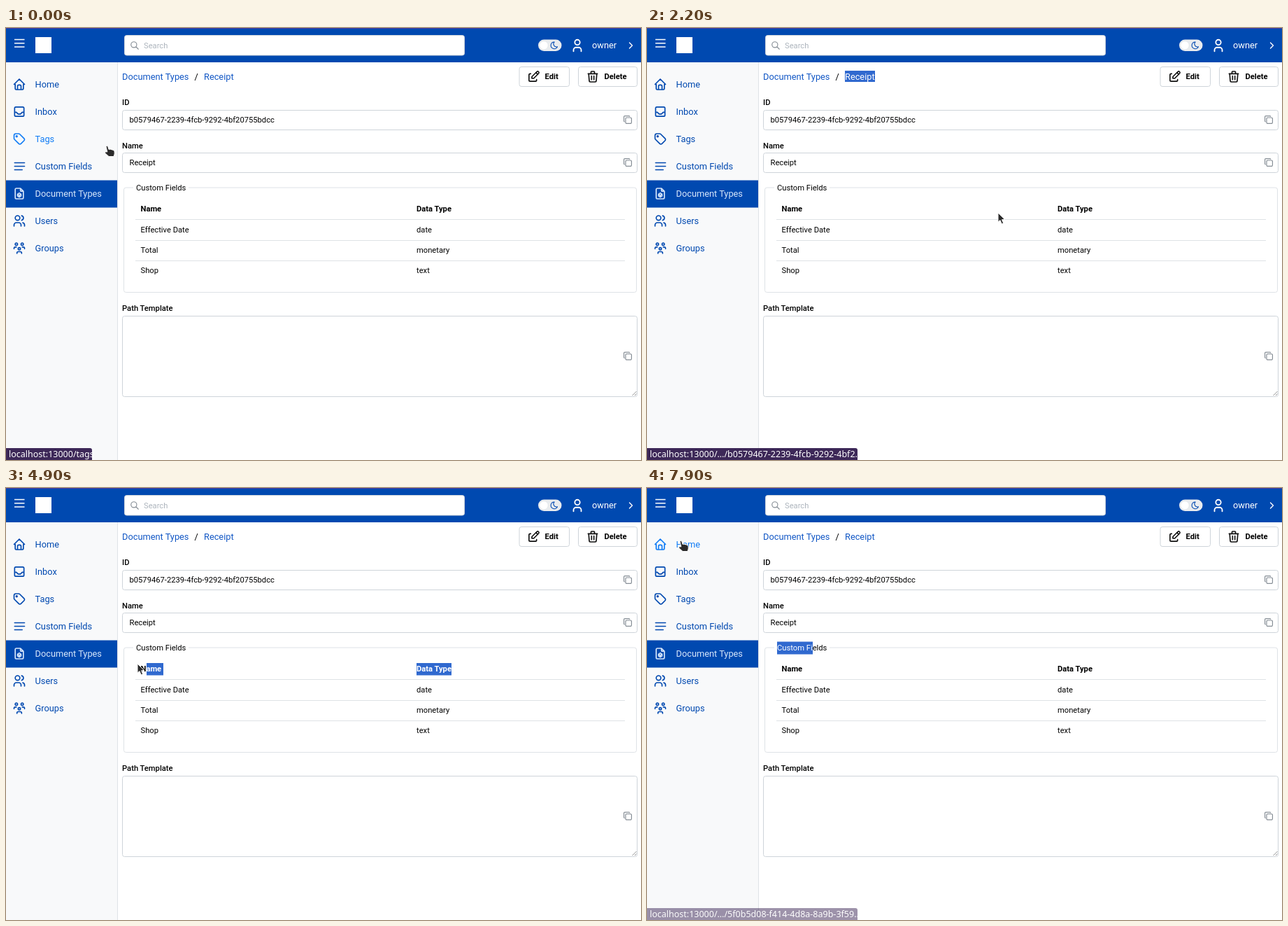
Animation, 908 px wide and 617 px high, one loop 8 s. Source, as an HTML page:

```html
<!DOCTYPE html>
<html lang="en">
<head>
<meta charset="utf-8">
<title>Document type details</title>
<style>
  html, body { margin: 0; width: 100%; height: 100%; overflow: hidden; background: #fff; }
  svg { display: block; width: 908px; height: 617px; font-family: Roboto, sans-serif; }
  text { white-space: pre; }
</style>
</head>
<body>
<svg id="stage" viewBox="0 0 908 617"></svg>
<script>
const LOOP = 8000, STEP = 100;
const BLUE = '#0049b0', LINK = '#1257c5', HOVER = '#117cf5', BORDER = '#ced4da', SELECT = '#3069cf';
const stage = document.getElementById('stage');

function add(tag, attrs, parent = stage) {
  const node = document.createElementNS('http://www.w3.org/2000/svg', tag);
  for (const key in attrs) node.setAttribute(key, attrs[key]);
  parent.append(node);
  return node;
}
const rect = (x, y, width, height, fill, more = {}, parent) =>
  add('rect', { x, y, width, height, fill, ...more }, parent);
const box = (x, y, w, h, stroke = BORDER, rx = 3) => rect(x, y, w, h, '#fff', { stroke, rx });
const line = (d, stroke, width = 1) => add('path', { d, stroke, 'stroke-width': width, fill: 'none' });
function label(content, x, y, { size = 11.2, weight = 400, fill = '#000', ...more } = {}, parent) {
  const node = add('text', { x, y, fill, 'font-size': size, 'font-weight': weight, ...more }, parent);
  node.textContent = content;
  return node;
}

const ICONS = {
  home: 'M5 12H3l9-9 9 9h-2M5 12v7a2 2 0 0 0 2 2h10a2 2 0 0 0 2-2v-7M9 21v-6a2 2 0 0 1 2-2h2a2 2 0 0 1 2 2v6',
  inbox: 'M4 6a2 2 0 0 1 2-2h12a2 2 0 0 1 2 2v12a2 2 0 0 1-2 2H6a2 2 0 0 1-2-2zM4 13h3l3 3h4l3-3h3',
  tag: 'M6.5 7.5a1 1 0 1 0 2 0a1 1 0 1 0-2 0M3 6v5.2a2 2 0 0 0 .6 1.4l7.7 7.7a2.4 2.4 0 0 0 3.4 0l5.6-5.6a2.4 2.4 0 0 0 0-3.4l-7.7-7.7A2 2 0 0 0 11.2 3H6a3 3 0 0 0-3 3z',
  lines: 'M4 6h17M4 12h17M4 18h13',
  file: 'M14 3v4a1 1 0 0 0 1 1h4M17 21H7a2 2 0 0 1-2-2V5a2 2 0 0 1 2-2h7l5 5v11a2 2 0 0 1-2 2zM9 13v3l3 2 3-2v-3l-3-2zM9 13l3 2 3-2M12 15v3',
  users: 'M5 7a4 4 0 1 0 8 0a4 4 0 1 0-8 0M3 21v-2a4 4 0 0 1 4-4h4a4 4 0 0 1 4 4v2M16 3.1a4 4 0 0 1 0 7.8M21 21v-2a4 4 0 0 0-3-3.8',
  group: 'M10 13a2 2 0 1 0 4 0a2 2 0 0 0-4 0M8 21v-1a2 2 0 0 1 2-2h4a2 2 0 0 1 2 2v1M15 5a2 2 0 1 0 4 0a2 2 0 0 0-4 0M17 10h2a2 2 0 0 1 2 2v1M5 5a2 2 0 1 0 4 0a2 2 0 0 0-4 0M3 13v-1a2 2 0 0 1 2-2h2',
  user: 'M8 7a4 4 0 1 0 8 0a4 4 0 0 0-8 0M6 21v-2a4 4 0 0 1 4-4h4a4 4 0 0 1 4 4v2',
  chevron: 'M9 6l6 6-6 6',
  edit: 'M7 7H6a2 2 0 0 0-2 2v9a2 2 0 0 0 2 2h9a2 2 0 0 0 2-2v-1M20.4 6.6a2.1 2.1 0 0 0-3-3L9 12v3h3zM16 5l3 3',
  trash: 'M4 7h16M10 11v6M14 11v6M5 7l1 12a2 2 0 0 0 2 2h8a2 2 0 0 0 2-2l1-12M9 7V4a1 1 0 0 1 1-1h4a1 1 0 0 1 1 1v3',
  copy: 'M7 9.7A2.7 2.7 0 0 1 9.7 7h8.6A2.7 2.7 0 0 1 21 9.7v8.6A2.7 2.7 0 0 1 18.3 21H9.7A2.7 2.7 0 0 1 7 18.3zM4 16.7A2 2 0 0 1 3 15V5c0-1.1.9-2 2-2h10c.8 0 1.2.4 1.5 1',
  search: 'M3 10a7 7 0 1 0 14 0a7 7 0 1 0-14 0M21 21l-6-6',
  moon: 'M12 3h.4a7.5 7.5 0 0 0 7.9 12.4A9 9 0 1 1 12 3z'
};
const icon = (name, cx, cy, size, stroke, parent) => add('path', {
  d: ICONS[name], stroke, fill: 'none', 'stroke-width': 2, 'stroke-linecap': 'round', 'stroke-linejoin': 'round',
  transform: `translate(${cx - size / 2} ${cy - size / 2}) scale(${size / 24})`
}, parent);

// Text whose selected span is shown white on blue.
let clipCount = 0;
function selectable(content, x, y, top, height, style) {
  const id = 'selection' + clipCount++;
  label(content, x, y, style);
  const mark = rect(0, top, 0, height, SELECT);
  const clip = rect(0, top, 0, height, '#000', {}, add('clipPath', { id }));
  label(content, x, y, { ...style, fill: '#fff', 'clip-path': `url(#${id})` });
  return (from, to) => {
    for (const node of [mark, clip]) {
      node.setAttribute('x', from);
      node.setAttribute('width', Math.max(0, to - from));
    }
  };
}

// Header
rect(0, 0, 908, 49, BLUE);
rect(0, 0, 908, 1, '#4b3a9c');
line('M12 16.5h14.5M12 21.7h14.5M12 26.9h14.5', '#fff', 1.5);
rect(42, 13, 23, 23, '#fff');
box(169.5, 10.5, 486, 28.5);
icon('search', 184, 25, 14, '#868e96');
label('Search', 197, 29, { fill: '#adb5bd' });
rect(761, 16.5, 33.5, 16.5, '#e9ecef', { rx: 8.2 });
add('circle', { cx: 769, cy: 24.8, r: 6.2, fill: '#fff', stroke: '#dee2e6', 'stroke-width': .7 });
icon('moon', 784, 24.8, 13, BLUE);
icon('user', 817, 25, 22, '#fff');
label('owner', 838, 29, { size: 12.8, fill: '#fff' });
icon('chevron', 893.5, 25, 16, '#fff');

// Sidebar
rect(0, 49, 159, 568, '#f8f9fa');
rect(159, 49, 1, 568, '#dee2e6');
rect(0, 217.5, 159, 39, BLUE);
const ACTIVE = 4;
const navItems = [
  ['Home', 'home'], ['Inbox', 'inbox'], ['Tags', 'tag'], ['Custom Fields', 'lines'],
  ['Document Types', 'file'], ['Users', 'users'], ['Groups', 'group']
].map(([name, glyph], i) => {
  const item = add('g', {}), y = 80.5 + 39 * i;
  icon(glyph, 19, y, 20, 'currentColor', item);
  label(name, 41.5, y + 4.4, { size: 12.8, fill: 'currentColor' }, item);
  return item;
});

// Breadcrumbs and buttons
label('Document Types', 166, 73.6, { size: 12.8, fill: LINK });
label('/', 269.5, 73.6, { size: 12.8 });
const selectReceipt = selectable('Receipt', 283, 73.6, 61, 16, { size: 12.8, fill: LINK });
const button = (name, glyph, x, width, textX) => {
  box(x, 55.5, width, 28);
  icon(glyph, x + 20.5, 69.5, 20, '#111');
  label(name, textX, 73.4, { weight: 600 });
};
button('Edit', 'edit', 734, 71.5, 770.5);
button('Delete', 'trash', 818.5, 84, 855.5);

// Form
const field = (name, value, labelY, top, height) => {
  label(name, 166, labelY, { weight: 500 });
  box(166.5, top, 736, height);
  label(value, 176.5, top + 17.8);
  icon('copy', 889, top + height / 2 - .5, 14.5, '#868e96');
};
field('ID', 'b0579467-2239-4fcb-9292-4bf20755bdcc', 110, 117.5, 28);
field('Name', 'Receipt', 172, 178.5, 28);
box(168.5, 228, 733, 149.5, '#dee2e6');
rect(182, 226, 79, 4, '#fff');
const selectLegend = selectable('Custom Fields', 186, 232, 219.5, 18);
const selectName = selectable('Name', 192.5, 262, 250, 17.5, { weight: 700 });
const selectType = selectable('Data Type', 587, 262, 250, 17.5, { weight: 700 });
line('M185 273.5h700M185 303.5h700M185 332.5h700', '#dee2e6');
[['Effective Date', 'date'], ['Total', 'monetary'], ['Shop', 'text']].forEach(([name, type], i) => {
  label(name, 192.5, 291.7 + 29.2 * i);
  label(type, 587, 291.7 + 29.2 * i);
});
field('Path Template', '', 404, 411.5, 115);
line('M895.5 525l6-6M899 525l2.5-2.5', '#777', .8);

// Link preview in the corner
const status = add('g', {});
const statusBox = add('path', { fill: '#3d2858' }, status);
const statusText = label('', 4, 613, { size: 12.5, fill: '#fff', 'font-family': 'Noto Sans, sans-serif' }, status);

// Mouse pointer, tip at the origin
const pointer = add('g', { stroke: '#fff', 'stroke-width': 1, 'stroke-linejoin': 'round', fill: '#2b2b2b' });
const arrow = add('path', { d: 'M0 0V13.2L3 10.6 5.2 15.8 7.7 14.7 5.5 9.8 9.7 9.5Z' }, pointer);
const hand = add('path', {
  d: 'M-1 1.2Q0-.6 1.6.8L3 5.4 5 5 7 5.7 9 6.2Q11.3 6.5 11.2 9V12L10 15.5H3L-2.5 10.5Q-2.8 8.4-.4 8.8L.8 9Z'
}, pointer);

// Each stop: time, x, y
const path = [
  [0, 144, 168], [200, 165, 165], [500, 235, 135], [900, 313, 92], [1300, 334, 70], [1400, 339, 68],
  [1500, 328, 68], [1800, 282, 68], [1900, 282, 68], [2000, 310, 85], [2200, 502, 264], [2300, 520, 275],
  [2400, 487, 240], [2500, 487, 240], [2700, 330, 182], [2900, 175, 173], [3000, 165, 220],
  [3200, 200, 340], [3300, 220, 395], [3400, 228, 281], [3700, 225, 280], [4000, 201, 258],
  [4400, 201, 258], [4900, 188, 251], [5200, 232, 220], [5300, 237, 222], [5600, 186, 225], [5700, 195, 230],
  [5900, 400, 290], [6000, 530, 308], [6100, 578, 293], [6300, 588, 310], [6500, 450, 352],
  [6700, 230, 340], [6800, 168, 300], [7000, 190, 250], [7300, 110, 190], [7600, 65, 110], [7800, 50, 80], [7900, 48, 75]
];
function pointerAt(t) {
  const next = path.findIndex(stop => stop[0] > t);
  if (next < 0) return path[path.length - 1].slice(1);
  const [t0, x0, y0] = path[next - 1], [t1, x1, y1] = path[next];
  const k = (t - t0) / (t1 - t0);
  return [x0 + (x1 - x0) * k, y0 + (y1 - y0) * k];
}

const clamp = (value, low, high) => Math.min(high, Math.max(low, value));
// Left edge of a selection dragged leftwards until the given time
const dragEdge = (t, end, low, high) => clamp(pointerAt(Math.min(t, end))[0], low, high);

function statusAt(t) {
  if (t < 400) return ['localhost:13000/tags', 123, clamp((400 - t) / 150, 0, 1)];
  if (t >= 1500 && t < 2400) {
    return ['localhost:13000/…/b0579467-2239-4fcb-9292-4bf2…', 301, Math.min((t - 1400) / 200, (2400 - t) / 150, 1)];
  }
  if (t >= 7800) return ['localhost:13000/…/5f0b5d08-f414-4d8a-8a9b-3f59…', 301, (t - 7700) / 400];
  return ['', 0, 0];
}

function draw(t) {
  const [x, y] = pointerAt(t);
  const hovered = x < 159 ? Math.floor((y - 61) / 39) : -1;
  navItems.forEach((item, i) =>
    item.setAttribute('color', i === ACTIVE ? '#d6e5fa' : i === hovered ? HOVER : BLUE));

  const overLink = x >= 283 && x <= 326 && y >= 61 && y <= 77;
  const pointing = hovered >= 0 || overLink;
  hand.setAttribute('visibility', pointing ? 'visible' : 'hidden');
  arrow.setAttribute('visibility', pointing ? 'hidden' : 'visible');
  pointer.setAttribute('transform', `translate(${x} ${y})`);

  const receipt = t >= 1400 && t < 3700;
  selectReceipt(receipt ? dragEdge(t, 1800, 283, 326) : 326, 326);
  const heading = t >= 3900 && t < 5300;
  selectName(heading ? dragEdge(t, 4000, 200.5, 225) : 225, 225);
  selectType(587, heading ? 637 : 587);
  selectLegend(t >= 5300 ? dragEdge(t, 5600, 186, 237) : 237, 237);

  const [content, width, opacity] = statusAt(t);
  statusText.textContent = content;
  statusBox.setAttribute('d', `M0 600H${Math.max(0, width - 3)}q3 0 3 3V617H0Z`);
  status.setAttribute('opacity', opacity);
}

const start = performance.now();
function tick() {
  const t = (performance.now() - start) % LOOP;
  draw(Math.floor(t / STEP) * STEP);
  requestAnimationFrame(tick);
}
tick();
</script>
</body>
</html>
```
